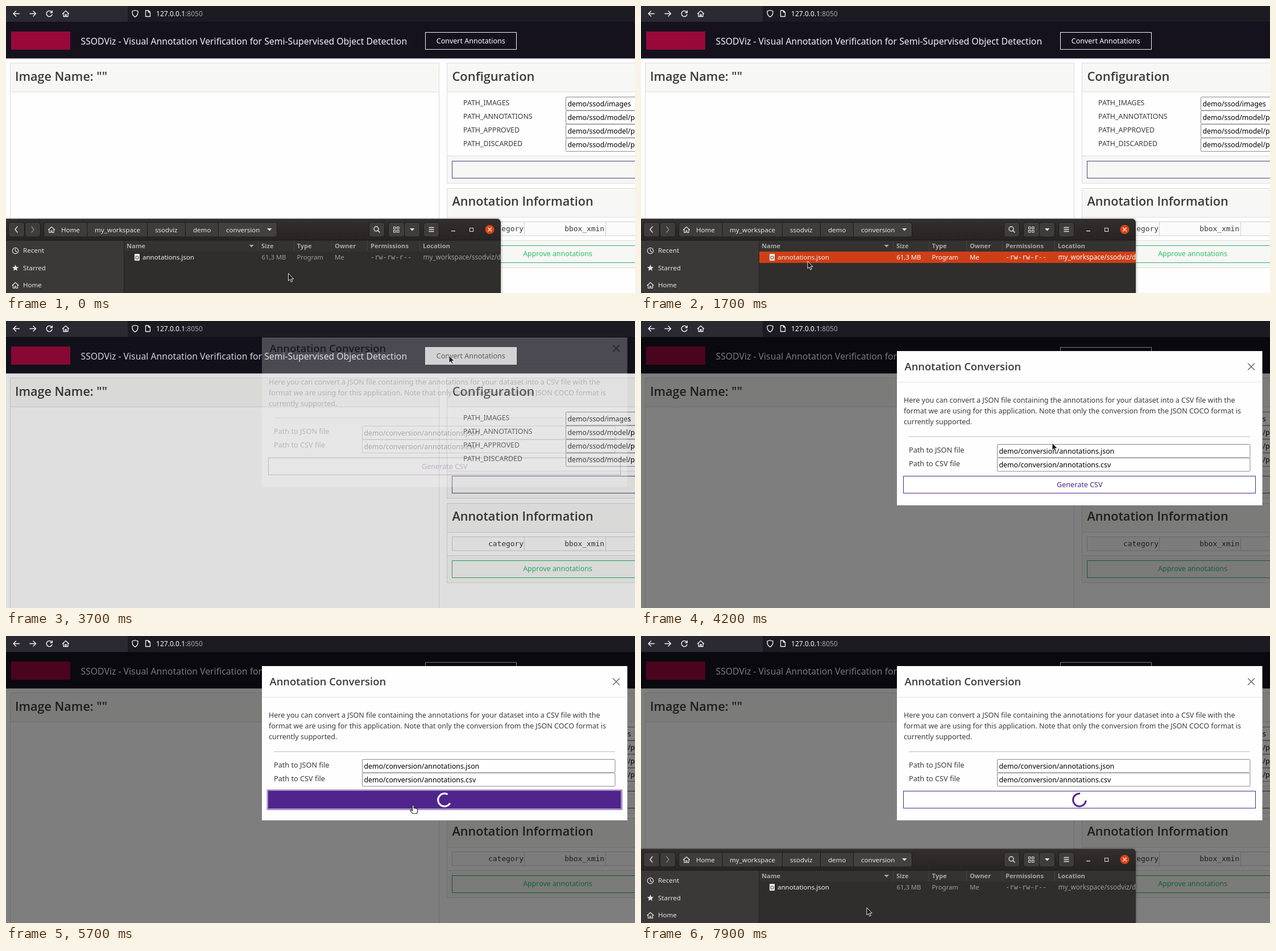
Recreate the animation shown at these times as an HTML page. Size 1106x506 px, loop 8 s.

```html
<!DOCTYPE html>
<html lang="en">
<head>
<meta charset="utf-8">
<title>Annotation conversion</title>
<style>
html, body { margin: 0; width: 100%; height: 100%; overflow: hidden; background: #fefefe; }
svg { display: block; width: 1106px; height: 506px; }
text { font-family: "Noto Sans", "Open Sans", sans-serif; white-space: pre; }
.h { font-family: "Open Sans", "Noto Sans", sans-serif; font-weight: 600; }
.b { font-weight: 700; }
.m { font-family: "DejaVu Sans Mono", monospace; }
.line { fill: none; stroke-linecap: round; stroke-linejoin: round; }
</style>
</head>
<body>
<svg id="stage" viewBox="0 0 1106 506" xmlns="http://www.w3.org/2000/svg"></svg>
<script>
const LOOP = 8000, STEP = 100;
const PURPLE = [80, 36, 141], WHITE = [255, 255, 255], DARK = [14, 14, 18];
const INK = '#3a3a3a', EDGE = '#dcdcdc', HEAD = '#f7f7f6';
const rgb = c => `rgb(${c.map(Math.round)})`;

// Markup helpers
const rect = (x, y, w, h, fill, more = '') =>
  `<rect x="${x}" y="${y}" width="${w}" height="${h}" fill="${fill}" ${more}/>`;
const frame = (x, y, w, h, stroke, fill = 'none', more = '') =>
  rect(x, y, w, h, fill, `stroke="${stroke}" ${more}`);
const text = (x, y, size, fill, str, more = '') =>
  `<text x="${x}" y="${y}" font-size="${size}" fill="${fill}" ${more}>${str}</text>`;
const line = (d, stroke, width = 1, more = '') =>
  `<path class="line" d="${d}" stroke="${stroke}" stroke-width="${width}" ${more}/>`;
const shape = (d, fill) => `<path d="${d}" fill="${fill}"/>`;
const mid = 'text-anchor="middle"', end = 'text-anchor="end"';

const field = (x, y, w, str) =>
  frame(x, y, w, 23.5, '#85858a', '#fff', 'rx="1.5"') + text(x + 3, y + 16.5, 12.3, '#000', str);

function browserBar() {
  const c = '#f4f4f6';
  return rect(0, 0, 1106, 29, '#1c1b22') + rect(0, 0, 214, 28, '#2b2a33') +
    rect(0, 28, 1106, 1, '#101015') +
    line('M23.5 13.5H13M17.5 9L13 13.5L17.5 18', c, 1.4) +
    line('M42 13.5H52.5M48 9L52.5 13.5L48 18', c, 1.4) +
    line('M80.5 11A5 5 0 1 0 81 15M81.3 8.5V11.8H78', c, 1.4) +
    line('M99.5 13.5L105 8.5L110.5 13.5M101 12.5V18.5H109V12.5M104 18.5V15H106V18.5', c, 1.3) +
    line('M227 7.5L232 9.2C232.3 14 230.5 17.5 227 19.3C223.5 17.5 221.7 14 222 9.2Z', c, 1.3) +
    line('M245.5 8H250.5L253.5 11V18.5H245.5ZM250.5 8V11H253.5', c, 1.3) +
    text(264, 18, 12.05, '#fbfbfe', '127.0.0.1<tspan fill="#a3a2aa">:8050</tspan>');
}

function page() {
  const labels = ['IMAGES', 'ANNOTATIONS', 'APPROVED', 'DISCARDED'];
  const card = (x, y, w, h) => frame(x, y, w, h, EDGE, '#fefefe') + frame(x, y, w, 51, EDGE, HEAD);
  return rect(0, 29, 1106, 477, '#fefefe') +
    rect(0, 29, 1106, 63.5, '#15121e') +
    rect(9, 45, 104, 32, '#98093a') +
    text(131.5, 67.5, 15.76, '#f1f1f3',
      'SSODViz - Visual Annotation Verification for Semi-Supervised Object Detection') +
    card(7.5, 100.5, 754, 430) +
    text(16, 132, 21.5, INK, 'Image Name: ""', 'class="h"') +
    card(775.5, 100.5, 400, 212) +
    text(784.5, 132, 21.9, INK, 'Configuration', 'class="h"') +
    labels.map((s, i) => text(804, 174.5 + 24.1 * i, 12.4, INK, 'PATH_' + s) +
      field(984.5, 160.5 + 24.1 * i, 200, i ? 'demo/ssod/model/pred' : 'demo/ssod/images')).join('') +
    frame(775.5, 264.5, 400, 48, EDGE, HEAD) +
    frame(784.5, 273.5, 380, 30, '#55407c') +
    card(775.5, 321.5, 400, 140) +
    text(784.5, 351.5, 21.6, INK, 'Annotation Information', 'class="h"') +
    frame(784.5, 380.5, 400, 24.5, '#d0d0d0', '#fafafa') +
    line('M911.5 380.5V405M1054.5 380.5V405', '#d0d0d0') +
    text(910, 397, 12.9, INK, 'category', end + ' class="m"') +
    text(1052, 397, 12.9, INK, 'bbox_xmin', end + ' class="m"') +
    frame(775.5, 413.5, 400, 48, EDGE, HEAD) +
    frame(784.5, 422.5, 380, 30, '#2cb45f') +
    text(970, 441.3, 12.4, '#2cbf64', 'Approve annotations', mid) +
    frame(737.5, 46.5, 160, 30, '#f4f4f4', '#fff', 'id="conv" fill-opacity="0"') +
    text(817.3, 65.7, 12.5, '#fff', 'Convert Annotations', mid + ' id="convText"');
}

function modal() {
  const para = [
    'Here you can convert a JSON file containing the annotations for your dataset into a CSV file with the',
    'format we are using for this application. Note that only the conversion from the JSON COCO format is',
    'currently supported.'];
  return rect(450, 53, 642.5, 272, '#fefefe') +
    rect(450, 107.5, 642.5, 1, '#e6e6e6') +
    text(463.5, 87, 18.4, INK, 'Annotation Conversion', 'class="h"') +
    line('M1067.5 75L1078.5 86M1078.5 75L1067.5 86', '#6c6c6c', 1.6) +
    para.map((s, i) => text(462, 144 + 19.2 * i, 12.5, INK, s)).join('') +
    rect(471, 203, 600, 1.5, '#d0d0d0') +
    text(471, 231.5, 12.7, INK, 'Path to JSON file') +
    text(471, 255.5, 12.7, INK, 'Path to CSV file') +
    field(626.5, 217.5, 444.5, 'demo/conversion/annotations.json') +
    field(626.5, 241.5, 444.5, 'demo/conversion/annotations.csv') +
    rect(458.5, 270.5, 625.5, 36.5, '#a892c6', 'id="ring" rx="1"') +
    frame(461.5, 273.5, 619, 30, rgb(PURPLE), '#fff', 'id="gen"') +
    text(771.3, 293.3, 12.6, rgb(PURPLE), 'Generate CSV', mid + ' id="genText"') +
    '<circle id="spin" r="11.3" fill="none" stroke-width="3.1" pathLength="4" stroke-dasharray="3 1"/>';
}

function fileWindow() {
  const c = '#e6e5e3', seg = '#3f3d3b', edge = '#1d1c1b';
  const button = (x, w) => frame(x + .5, 381.5, w - 1, 25.5, edge, seg, 'rx="4"');
  const cell = (x, size, str, more) => text(x, 447.3, size, 'inherit', str, more);
  const heads = [[212, 'Name'], [449, 'Size'], [511.5, 'Type'], [578, 'Owner'], [641, 'Permissions'], [733, 'Location']];
  const crumbs = [[97, 'Home'], [156, 'my_workspace'], [262, 'ssodviz'], [329, 'demo'], [387, 'conversion']];
  const house = (x, y) => line(`M${x - 5.5} ${y + .5}L${x} ${y - 4.5}L${x + 5.5} ${y + .5}M${x - 4} ${y}V${y + 5.5}H${x - 1}V${y + 2}H${x + 1}V${y + 5.5}H${x + 4}V${y}`, c, 1.2);
  return rect(-10, 373, 884, 150, '#000', 'rx="9" opacity=".06"') +
    rect(-10, 374, 881.5, 150, '#000', 'rx="8" opacity=".1"') +
    '<g clip-path="url(#win)">' +
    rect(0, 375, 870, 38, 'url(#bar)') + rect(0, 375, 870, 1, '#454341') +
    rect(0, 413, 207, 93, '#3a3937') + rect(207, 413, 663, 93, '#2f2e2c') +
    rect(207, 413, 663, 20, '#343331') + rect(0, 412.5, 870, 1, '#1b1a19') + rect(207, 413, 1, 93, '#242322') +
    line('M443.5 414V432M506.5 414V432M572.5 414V432M635.5 414V432M727.5 414V432', '#45433f') +
    button(4, 29) + button(33, 28) + button(66, 411) +
    line('M143 382V407M248.5 382V407M315.5 382V407M373.5 382V407', edge) +
    rect(374, 382, 102, 24.5, '#4a4846', 'rx="3" opacity=".4"') +
    line('M20 389L16 394L20 399', c, 1.4) + line('M45 389L49 394L45 399', '#8b8986', 1.4) +
    house(80, 394) + crumbs.map(([x, s]) => text(x, 398.5, 11.55, c, s)).join('') +
    shape('M459 392H467.5L463.25 396.5Z', c) +
    button(638, 28) + button(672, 29) + button(700, 28) + button(734, 28) +
    '<circle cx="651" cy="393" r="4" fill="none" stroke="#e6e5e3" stroke-width="1.4"/>' +
    line('M654 396L657 399', c, 1.5) +
    [0, 6].map(a => [0, 6].map(b => frame(681.5 + a, 389.5 + b, 3.5, 3.5, c)).join('')).join('') +
    shape('M710 392H718.5L714.25 396.5Z', c) +
    line('M744 390.5H752M744 394H752M744 397.5H752', c, 1.4) +
    rect(783, 396, 7, 1.3, c) + frame(815.5, 391.5, 6, 6, c) +
    '<circle cx="850.5" cy="394" r="8" fill="#db4319"/>' +
    line('M847.7 391.2L853.3 396.8M853.3 391.2L847.7 396.8', '#fff', 1.3) +
    heads.map(([x, s]) => text(x, 427, 11.1, '#aaa8a4', s, 'class="b"')).join('') +
    shape('M427.5 421H436L431.75 425.5Z', '#aaa8a4') +
    rect(208, 433, 662, 20, '#cf3f17', 'id="row"') +
    rect(226, 437, 9, 12, '#f3f2f0', 'rx="1"') +
    '<circle cx="230.5" cy="443.5" r="2.5" fill="none" stroke="#555" stroke-width="1.2"/>' +
    text(240, 447.3, 11.56, '#f2f1ef', 'annotations.json') +
    '<g id="cells">' + cell(449.5, 11.3, '61,3 MB') + cell(511.5, 11.3, 'Program') + cell(578, 11.3, 'Me') +
    cell(641, 12, '-rw-rw-r--', 'class="m"') + cell(733.5, 11.7, 'my_workspace/ssodviz/demo') + '</g>' +
    '<circle cx="16.5" cy="431.5" r="5.2" fill="none" stroke="#e6e5e3" stroke-width="1.2"/>' +
    line('M16.5 428.5V431.5L18.7 433.5', c, 1.2) +
    shape('M16.5 456L18.1 460L22.2 460.2L19 462.9L20 467L16.5 464.7L13 467L14 462.9L10.8 460.2L14.9 460Z', c) +
    house(16.5, 492) +
    ['Recent', 'Starred', 'Home'].map((s, i) => text(30, 435.4 + 30.5 * i, 11.55, c, s)).join('') + '</g>';
}

const arrow = '<path id="arrow" d="M0 0V13L3 10.3L5 15L7.2 14L5.2 9.6H9.2Z" fill="#181818" stroke="#fff" stroke-width=".9"/>';
const hand = '<path id="hand" d="M-1.5 8V1.3Q-1.5 0 -.2 0Q1 0 1 1.3V5.5Q2.5 4.8 3.5 6Q5 5.4 5.8 6.7Q7.8 6.5 7.8 8.5V11L6.5 15H-1L-5 10Q-5.4 8.3 -3.8 8.3L-1.5 10Z" fill="#fff" stroke="#222" stroke-width="1.1" stroke-linejoin="round"/>';

document.getElementById('stage').innerHTML =
  `<defs><clipPath id="win"><path d="M0 375H862Q870 375 870 383V506H0Z"/></clipPath>
  <linearGradient id="bar" x2="0" y2="1"><stop stop-color="#322f2e"/><stop offset="1" stop-color="#272524"/></linearGradient></defs>` +
  page() + rect(0, 29, 1106, 477, '#000', 'id="shade"') + `<g id="modal">${modal()}</g>` +
  browserBar() + `<g id="files">${fileWindow()}</g><g id="cursor">${arrow}${hand}</g>`;

const el = id => document.getElementById(id);
const set = (id, attrs) => { for (const k in attrs) el(id).setAttribute(k, attrs[k]); };
const show = (id, on) => set(id, { visibility: on ? 'visible' : 'hidden' });
const ramp = (t, a, b) => Math.min(1, Math.max(0, (t - a) / (b - a)));
const mix = (a, b, k) => rgb(a.map((v, i) => v + (b[i] - v) * k));
const within = (t, a, b) => t >= a && t < b;

// CSS ease-out, cubic-bezier(0, 0, .58, 1)
function easeOut(x) {
  let lo = 0, hi = 1;
  for (let i = 0; i < 20; i++) {
    const s = (lo + hi) / 2;
    if (1.74 * (1 - s) * s * s + s ** 3 < x) lo = s; else hi = s;
  }
  return 3 * (1 - lo) * lo * lo + lo ** 3;
}

// Pointer path: time, x, y
const path = [
  [300, 496.5, 471.5], [500, 470, 460], [800, 325, 420], [1000, 285.5, 439], [1400, 285.5, 439],
  [1700, 293, 450], [1900, 309, 453], [2000, 309, 453], [2200, 325, 463], [2400, 455, 350],
  [2600, 690, 135], [2700, 752, 74], [2900, 779, 61], [3800, 779, 61], [4000, 752, 140],
  [4200, 723, 215], [4300, 721, 210], [4400, 720, 217], [4600, 718, 284], [4800, 717, 306],
  [4900, 717, 306], [5200, 716, 298], [5800, 716, 298], [6000, 690, 400], [6200, 650, 512],
  [6600, 560, 512], [6900, 470, 488], [7100, 430, 481], [7400, 408, 482], [7900, 397, 479]];

function pointer(t) {
  const i = path.findIndex(p => p[0] > t);
  if (i < 0) return path[path.length - 1].slice(1);
  if (!i) return path[0].slice(1);
  const [a, b] = [path[i - 1], path[i]], k = ramp(t, a[0], b[0]);
  return [a[1] + (b[1] - a[1]) * k, a[2] + (b[2] - a[2]) * k];
}

function draw(t) {
  const [x, y] = pointer(t);
  const overButton = within(t, 3200, 3500) || within(t, 4600, 4700) || within(t, 5100, 5900);
  set('cursor', { transform: `translate(${x} ${y})` });
  show('arrow', !overButton);
  show('hand', overButton);
  set('hand', { transform: t < 3500 ? 'translate(1.5 -1)' : '' });

  const conv = ramp(t, 2660, 2800) * (1 - ramp(t, 3680, 3830));
  set('conv', { 'fill-opacity': conv });
  set('convText', { fill: mix(WHITE, DARK, conv) });

  const fade = ramp(t, 3664, 3814);
  set('shade', { opacity: fade / 2 });
  set('modal', { opacity: fade, transform: `translate(0 ${-40 * (1 - easeOut(ramp(t, 3664, 3964)))})` });

  const gen = ramp(t, 4480, 4600) - ramp(t, 4690, 4820) + ramp(t, 5040, 5190) - ramp(t, 5880, 6020);
  const busy = t >= 5700, ink = mix(PURPLE, WHITE, gen);
  set('gen', { fill: mix(WHITE, PURPLE, gen) });
  set('genText', { fill: ink, opacity: busy ? 0 : 1 });
  set('ring', { opacity: within(t, 5700, 6300) ? 1 : 0 });
  set('spin', { stroke: ink, opacity: busy ? 1 : 0,
    transform: `translate(771 289) rotate(${30 + (t - 5700) * 360 / 750})` });

  const picked = within(t, 1100, 7100);
  set('files', { display: within(t, 3500, 6300) ? 'none' : 'inline' });
  set('row', { opacity: picked ? 1 : 0 });
  set('cells', { fill: picked ? '#fff' : '#a09e9a' });
}

const start = performance.now();
function tick() {
  const t = (performance.now() - start) % LOOP;
  draw(Math.floor((t + 5) / STEP) * STEP % LOOP);
  requestAnimationFrame(tick);
}
tick();
</script>
</body>
</html>
```
